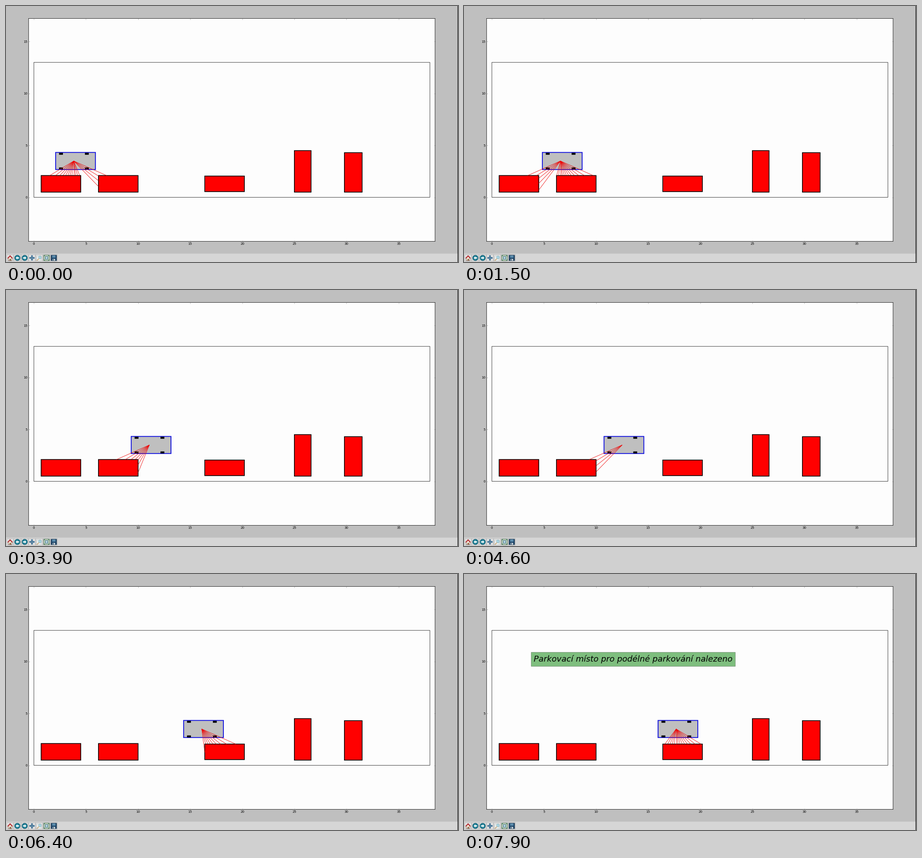
These frames come from a looping animation (992x564 px, 8000 ms). A matplotlib script:

```python
import numpy as np
import matplotlib.pyplot as plt
from matplotlib.animation import FuncAnimation
from matplotlib.collections import LineCollection
from matplotlib.patches import Circle, Polygon, Rectangle

W, H, DPI = 992, 564, 64
FRAMES, INTERVAL = 80, 100
PT = 72 / DPI                 # points per pixel
UNIT = 892 / 39               # pixels per metre
plt.rcParams["font.family"] = "DejaVu Sans"

# parked cars: left, bottom, right, top
PARKED = [
    (0.7, 0.5, 4.5, 2.1),
    (6.2, 0.5, 10.0, 2.1),
    (16.4, 0.55, 20.2, 2.05),
    (25.0, 0.5, 26.6, 4.5),
    (29.8, 0.5, 31.5, 4.3),
]
CAR_LEN, CAR_WID, SENSOR_DX, LANE_Y = 3.82, 1.65, 1.74, 3.5
ANGLES = np.radians(np.linspace(-66, 66, 19))
RANGE = 4.0
KEY_FRAMES = [0, 15, 27, 39, 54, 64, 72.5]
KEY_X = [3.83, 6.585, 8.85, 11.08, 14.13, 16.11, 17.685]
FOUND = 73

fig = plt.figure(figsize=(W / DPI, H / DPI), dpi=DPI, facecolor="#bfbfbf")


def setup_axes():
    ax = fig.add_axes([49.7 / W, 1 - 518.5 / H, 892 / W, 491 / H], facecolor="#fdfdfd")
    ax.set_xlim(-0.5, 38.5)
    ax.set_ylim(-97 / UNIT, 394 / UNIT)
    ax.set_xticks(range(0, 36, 5))
    ax.set_yticks(range(0, 16, 5))
    ax.tick_params(direction="in", top=True, right=True, length=2.1 * PT,
                   width=0.5 * PT, color="#606060", labelsize=7.15 * PT,
                   pad=2.4 * PT)
    ax.patch.set_snap(False)
    for spine in ax.spines.values():
        spine.set_linewidth(0.8 * PT)
        spine.set_snap(False)
    return ax


def box(ax, x0, y0, x1, y1, face="none", edge="none", lw=0.0, z=1):
    return ax.add_patch(Rectangle((x0, y0), x1 - x0, y1 - y0, facecolor=face,
                                  edgecolor=edge, linewidth=lw * PT, zorder=z,
                                  snap=False))


def poly(ax, pts, color, z=3):
    ax.add_patch(Polygon(pts, facecolor=color, edgecolor="none", zorder=z))


def arrow_pts(cx, cy, s, d):
    """Left (d=-1) or right (d=1) pointing arrow."""
    shape = [(1, 0), (0, -1), (0, -0.4), (-1, -0.4), (-1, 0.4), (0, 0.4), (0, 1)]
    return [(cx + d * s * x, cy + s * y) for x, y in shape]


def draw_toolbar():
    ui = fig.add_axes([0, 0, 1, 1], zorder=5)
    ui.set_xlim(0, W)
    ui.set_ylim(H, 0)
    ui.axis("off")
    box(ui, 0, 545.5, W, H, "#d6d6d6")
    box(ui, 991, 0, W, H, "#101010", z=4)
    xs = [9 + 16 * i for i in range(7)]
    cy = 555
    for x in xs:
        box(ui, x - 7.5, 547.5, x + 7.5, 562.5, "#dedede", "#b4b4b4", 0.8)

    home, back, fwd, pan, zoom, layout, save = xs
    box(ui, home - 4, cy, home + 4, cy + 6, "#f2ead8", "#5a3a30", 0.8, 2)
    box(ui, home - 1, cy + 2, home + 1.5, cy + 6, "#7a4a2a", z=3)
    poly(ui, [(home - 6.5, cy + 1), (home, cy - 6), (home + 6.5, cy + 1)], "#b3262b")
    poly(ui, [(home - 3.5, cy + 1), (home, cy - 3), (home + 3.5, cy + 1)], "#f2ead8", 4)

    for x, d in ((back, -1), (fwd, 1)):
        ui.add_patch(Circle((x, cy), 6, facecolor="#1f7f95", edgecolor="#0e4f66",
                            linewidth=0.8 * PT, zorder=2))
        poly(ui, arrow_pts(x, cy, 3.6, d), "#f4fafa")

    box(ui, pan - 4, cy - 0.9, pan + 4, cy + 0.9, "#1d5a86", z=3)
    box(ui, pan - 0.9, cy - 4, pan + 0.9, cy + 4, "#1d5a86", z=3)
    for dx, dy in ((1, 0), (-1, 0), (0, 1), (0, -1)):
        poly(ui, [(pan + 6.3 * dx, cy + 6.3 * dy),
                  (pan + 3.2 * dx + 2.6 * dy, cy + 3.2 * dy + 2.6 * dx),
                  (pan + 3.2 * dx - 2.6 * dy, cy + 3.2 * dy - 2.6 * dx)], "#1d5a86")

    box(ui, zoom - 5, cy - 4, zoom + 4, cy + 6, "#f4f6f4", "#b5c4c8", 0.6, 2)
    ui.add_patch(Circle((zoom + 1.5, cy - 1), 3.5, facecolor="#a9d3e0",
                        edgecolor="#8fb0ba", linewidth=0.7 * PT, zorder=3))
    ui.plot([zoom - 1, zoom - 5], [cy + 2, cy + 5.5], color="#c9a878",
            lw=1.8 * PT, zorder=3)

    box(ui, layout - 6, cy - 6, layout + 6, cy + 6, "#e3ecd6", "#3d6b4a", 1, 2)
    box(ui, layout - 3, cy - 3, layout + 3, cy + 3, "#b8d8e0", "#1c4f6b", 1, 3)
    for dx, dy in ((1, 1), (1, -1), (-1, 1), (-1, -1)):
        poly(ui, [(layout + 5.5 * dx, cy + 5.5 * dy), (layout + 5.5 * dx, cy + 2.8 * dy),
                  (layout + 2.8 * dx, cy + 5.5 * dy)], "#2f6f4f", 4)

    box(ui, save - 6, cy - 6, save + 6, cy + 6, "#1c4468", "#0d2a45", 0.9, 2)
    box(ui, save - 3.7, cy - 5.5, save + 3.7, cy - 0.5, "#5f8fae", z=3)
    box(ui, save - 3, cy + 2, save + 3, cy + 6, "#c3ccd2", z=3)
    box(ui, save - 2, cy + 2.8, save - 0.3, cy + 5.6, "#1c4468", z=4)


def cast(x, y, angle):
    """Distance to the nearest parked car along a ray, angle from straight down."""
    dx, dy = np.sin(angle) + 1e-9, -np.cos(angle)
    best = RANGE
    for x0, y0, x1, y1 in PARKED:
        tx = sorted(((x0 - x) / dx, (x1 - x) / dx))
        ty = sorted(((y0 - y) / dy, (y1 - y) / dy))
        near, far = max(tx[0], ty[0]), min(tx[1], ty[1])
        if 0 < near <= far:
            best = min(best, near)
    return best, (x + best * dx, y + best * dy)


def scan(x):
    hits = (cast(x, LANE_Y, a) for a in ANGLES)
    return [[(x, LANE_Y), end] for dist, end in hits if dist < RANGE]


ax = setup_axes()
draw_toolbar()
box(ax, 0, 0, 38, 13, edge="#101010", lw=0.8)
for car in PARKED:
    box(ax, *car, face="#ff0000", edge="black", lw=1.6, z=2)

body = box(ax, 0, LANE_Y - CAR_WID / 2, CAR_LEN, LANE_Y + CAR_WID / 2,
           "#bfbfbf", "#0000e0", 1.7, 4)
wheels = [(dx, box(ax, dx, y, dx + 0.37, y + 0.19, "black", z=5))
          for dx in (0.33, 2.81) for y in (2.69, 4.1)]
rays = LineCollection([], colors="#f00000", linewidths=0.8 * PT, zorder=6)
ax.add_collection(rays)
label = ax.text(4, 10, "Parkovací místo pro podélné parkování nalezeno",
                style="italic", fontsize=17.87 * PT, zorder=7,
                bbox=dict(facecolor="green", alpha=0.5, pad=5.96 * PT,
                          linewidth=0.6 * PT))


def update(i):
    x = np.interp(i, KEY_FRAMES, KEY_X)
    left = x - SENSOR_DX
    body.set_x(left)
    for dx, wheel in wheels:
        wheel.set_x(left + dx)
    rays.set_segments(scan(x))
    label.set_visible(i >= FOUND)
    return [body, rays, label]


anim = FuncAnimation(fig, update, frames=FRAMES, interval=INTERVAL,
                     repeat=True, repeat_delay=0, blit=False)
plt.show()
```
